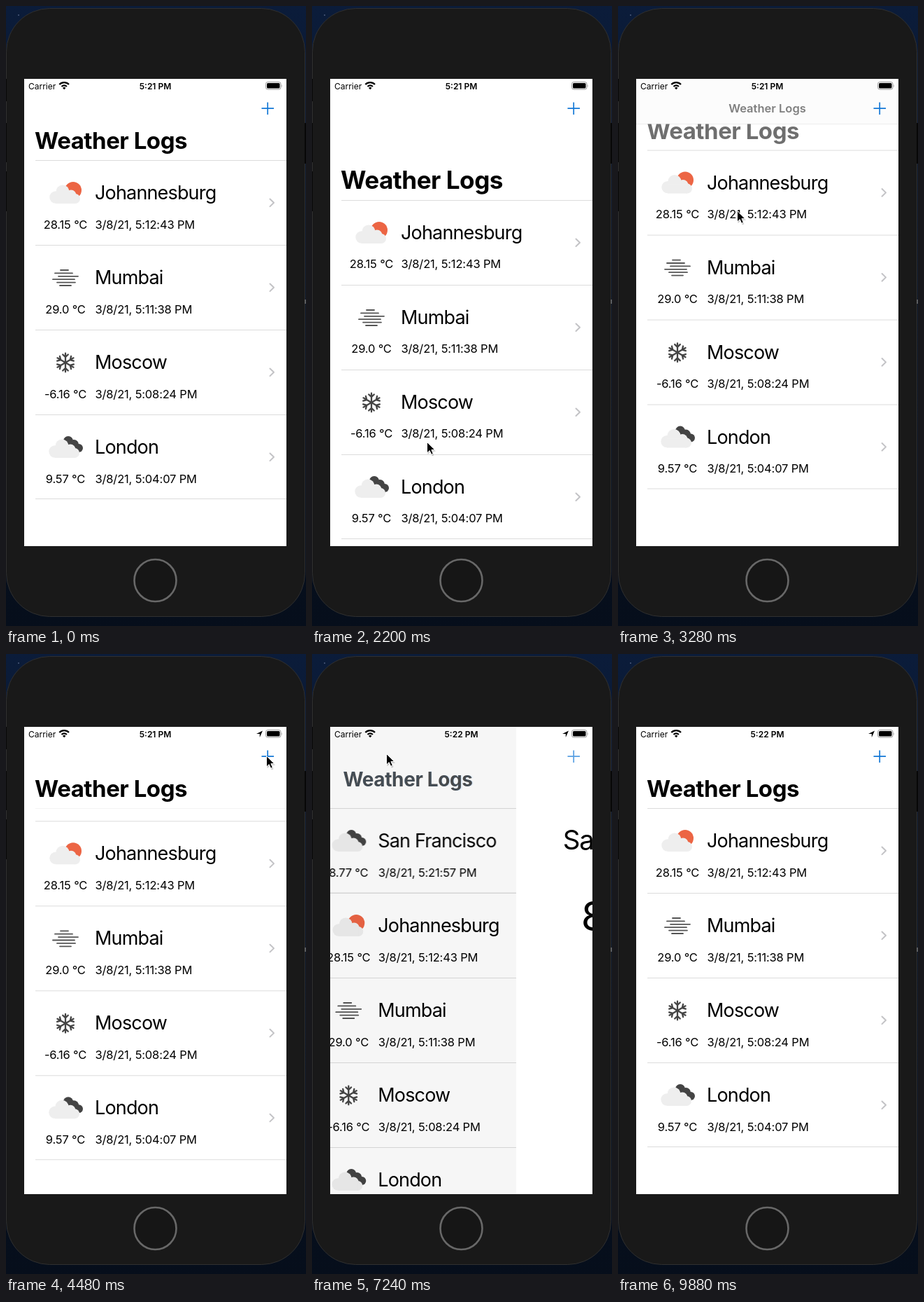
An HTML page that plays this animation: 429 px wide and 885 px high, repeating every 10000 ms.

```html
<!DOCTYPE html>
<html lang="en">
<head>
<meta charset="utf-8">
<title>Weather Logs</title>
<style>
html, body { margin: 0; width: 100%; height: 100%; overflow: hidden; background: #081224; }
svg { display: block; width: 429px; height: 885px; font-family: Inter, "Noto Sans", sans-serif; }
text { fill: #000; white-space: pre; }
.city { font-size: 27px; letter-spacing: -.031em; }
.body { font-size: 16.5px; letter-spacing: -.01em; }
.mid { text-anchor: middle; }
.large { font-size: 33px; font-weight: 700; letter-spacing: -.014em; }
.inline { font-size: 16.5px; font-weight: 600; }
.back { font-size: 16.5px; letter-spacing: -.01em; fill: #0a7aea; }
.small { font-size: 12px; }
.bold { font-weight: 600; }
.sep { stroke: #dcdcdc; stroke-width: 1; }
.chev { fill: none; stroke: #c3c3c6; stroke-width: 2; stroke-linecap: round; stroke-linejoin: round; }
.tint { fill: none; stroke: #1478d6; }

/* Every track shares one 10 s timeline: 1% = 100 ms. */
.a { animation: 10s linear infinite; }
.nav { animation-timing-function: cubic-bezier(.2, .6, .2, 1); }
.step { animation-timing-function: step-end; }

.scroll { animation-name: scroll; }
@keyframes scroll {
  0%, 7% { transform: translateY(0); animation-timing-function: ease-out; }
  15% { transform: translateY(48px); }
  22% { transform: translateY(57px); }
  23% { transform: translateY(56px); animation-timing-function: ease-in-out; }
  27% { transform: translateY(-60px); }
  29.5%, 30% { transform: translateY(-75px); }
  32.8% { transform: translateY(-14.5px); animation-timing-function: ease-out; }
  36%, 100% { transform: translateY(0); }
}
.stretch { transform-origin: 42px 204px; animation-name: stretch; }
@keyframes stretch {
  0%, 7% { transform: scale(1); animation-timing-function: ease-out; }
  15% { transform: scale(1.054); }
  22%, 23% { transform: scale(1.065); }
  24.9%, 100% { transform: scale(1); }
}
.fade { animation-name: fade; }
@keyframes fade {
  0%, 25% { opacity: 1; }
  26.2%, 32% { opacity: 0; }
  32.8% { opacity: .56; }
  33.6%, 100% { opacity: 1; }
}
.bar { animation-name: bar; }
@keyframes bar {
  0%, 25% { opacity: 0; }
  26.2%, 32% { opacity: 1; }
  32.8% { opacity: .5; }
  33.6%, 100% { opacity: 0; }
}
.cover { animation-name: cover; }
@keyframes cover { 0%, 25% { opacity: 0; } 26.2%, 33.6% { opacity: 1; } 36%, 100% { opacity: 0; } }

.rest { animation-name: rest; }
@keyframes rest {
  0%, 44% { transform: translateY(0); animation-timing-function: ease-in-out; }
  47%, 87.2% { transform: translateY(121px); animation-timing-function: ease-in-out; }
  90.2%, 100% { transform: translateY(0); }
}
.fresh { animation-name: fresh; }
@keyframes fresh {
  0%, 44% { opacity: 0; }
  46.5%, 90% { opacity: 1; }
  90.2%, 100% { opacity: 0; }
}
.swipe { animation-name: swipe; }
@keyframes swipe {
  0%, 81% { transform: translateX(0); animation-timing-function: ease-out; }
  83.6%, 87% { transform: translateX(-75px); animation-timing-function: ease-in; }
  89.5%, 90.3% { transform: translateX(-375px); }
  90.4%, 100% { transform: translateX(0); }
}

/* Push to the detail page and back */
.list { animation-name: list; }
@keyframes list {
  0%, 54.4%, 76.09%, 100% { transform: translateX(0); }
  59.4%, 71.09% { transform: translateX(-112.5px); }
}
.dim { animation-name: dim; }
@keyframes dim {
  0%, 54.4%, 76.09%, 100% { opacity: 0; }
  59.4%, 71.09% { opacity: .115; }
}
.detail { animation-name: detail; }
@keyframes detail {
  0%, 54.4%, 76.09%, 100% { transform: translateX(375px); }
  59.4%, 71.09% { transform: translateX(0); }
}
.shrink { animation-name: shrink; }
@keyframes shrink {
  0%, 54.4%, 76.09%, 100% { transform: translate(41px, 204px) scale(1); opacity: 1; }
  59.4%, 71.09% { transform: translate(53px, 152px) scale(.48); opacity: 0; }
}
.grow { animation-name: grow; }
@keyframes grow {
  0%, 54.4%, 76.09%, 100% { transform: translate(41px, 204px) scale(2.08); opacity: 0; fill-opacity: 0; }
  59.4%, 71.09% { transform: translate(53px, 152px) scale(1); opacity: 1; fill-opacity: 1; }
}
.plus { animation-name: plus; }
@keyframes plus {
  0%, 42.2%, 45%, 54.4%, 76.09%, 100% { opacity: 1; }
  42.5%, 43% { opacity: .3; }
  59.4%, 71.09% { opacity: 0; }
}
.arrow { animation-name: arrow; }
@keyframes arrow {
  0%, 57%, 71.6%, 100% { opacity: 0; }
  59.4%, 71.09% { opacity: 1; }
}

/* Hard switches */
.home { animation-name: home; }
@keyframes home { 0%, 76.09%, 100% { opacity: 1; } 54.4% { opacity: 0; } }
.away { animation-name: away; }
@keyframes away { 0%, 76.09%, 100% { opacity: 0; } 54.4% { opacity: 1; } }
.before { animation-name: before; }
@keyframes before { 0% { opacity: 1; } 71.2%, 100% { opacity: 0; } }
.after { animation-name: after; }
@keyframes after { 0% { opacity: 0; } 71.2%, 100% { opacity: 1; } }
.gps { animation-name: gps; }
@keyframes gps { 0% { opacity: 0; } 43.2%, 100% { opacity: 1; } }

.cursor { animation-name: cursor; animation-timing-function: ease-in-out; }
@keyframes cursor {
  0% { transform: translate(440px, 25px); }
  .4% { transform: translate(428px, 25px); }
  5% { transform: translate(175px, 480px); }
  7% { transform: translate(165px, 510px); animation-timing-function: ease-out; }
  15% { transform: translate(163px, 595px); }
  22% { transform: translate(164px, 622px); }
  23% { transform: translate(164px, 620px); }
  27% { transform: translate(169px, 330px); }
  29.5%, 33% { transform: translate(170px, 292px); }
  35% { transform: translate(190px, 280px); }
  41%, 46.5% { transform: translate(372px, 145px); }
  52%, 57.5% { transform: translate(266px, 268px); }
  64.4%, 67.2% { transform: translate(100px, 142px); }
  68.8%, 72.5% { transform: translate(106px, 142px); }
  79.5%, 81% { transform: translate(397px, 276px); animation-timing-function: ease-out; }
  83.6%, 84% { transform: translate(324px, 275px); }
  86.2%, 87.4% { transform: translate(361px, 278px); }
  91.2% { transform: translate(297px, 87px); animation-timing-function: linear; }
  93.2%, 100% { transform: translate(258px, -24px); }
}
</style>
</head>
<body>
<svg viewBox="0 0 429 885">
  <defs>
    <linearGradient id="night" x2="0" y2="1">
      <stop offset="0" stop-color="#0b1c3a"/>
      <stop offset=".5" stop-color="#081326"/>
      <stop offset="1" stop-color="#060e1b"/>
    </linearGradient>
    <clipPath id="screen"><path d="M26 104H401V771H26Z"/></clipPath>
    <g id="cloud" fill="#eee">
      <circle cx="-14" cy="6" r="8.7"/>
      <circle cx="-4" cy="-2" r="9.5"/>
      <circle cx="8" cy="3" r="7.5"/>
      <circle cx="14" cy="8" r="7"/>
      <rect x="-14" y="2" width="28" height="13"/>
    </g>
    <g id="sunny">
      <circle cx="11" cy="-4" r="12" fill="#ec6544"/>
      <use href="#cloud"/>
    </g>
    <g id="cloudy">
      <g fill="#444">
        <circle cx="4" cy="-9" r="7"/>
        <circle cx="12" cy="-4" r="7"/>
        <circle cx="19" cy="1" r="6"/>
      </g>
      <use href="#cloud" x="-1"/>
    </g>
    <path id="mist" fill="none" stroke="#555" stroke-width="1.8" stroke-linecap="round"
      d="M-7-11H4M-15-6.6H10M-10-2.2H18M-18 2.2H13M-12 6.6H14M-8 11H8"/>
    <g id="snow" fill="none" stroke="#444" stroke-width="2.3" stroke-linecap="round"></g>
  </defs>

  <rect width="429" height="885" fill="url(#night)"/>
  <circle cx="18" cy="13" r=".8" fill="#7886a8"/>
  <rect x=".5" y="3.5" width="427" height="868" rx="62" fill="#191919" stroke="#303030"/>
  <path d="M0 104V136M0 167V223M0 236V293M428 167V225" stroke="#080808" stroke-width="2"/>
  <path d="M428 419V425" stroke="#777" stroke-width="1.4"/>
  <circle cx="213.5" cy="820" r="30" fill="#161616" stroke="#686868" stroke-width="2.6"/>

  <g clip-path="url(#screen)">
    <rect x="26" y="104" width="375" height="667" fill="#fff"/>

    <g class="a nav list">
      <g class="a scroll">
        <g class="a fresh"><g class="a swipe" id="fresh"></g></g>
        <g class="a rest" id="rest"></g>
        <g class="a step home"><g class="a fade">
          <text class="a stretch large" x="41" y="204">Weather Logs</text>
        </g></g>
      </g>
      <g class="a cover">
        <rect x="26" y="104" width="375" height="64" fill="#fcfcfc"/>
        <path class="sep" d="M26 168.5H401" opacity=".5"/>
      </g>
      <text class="a bar inline mid" x="213.5" y="152">Weather Logs</text>
    </g>
    <rect class="a nav dim" x="26" y="104" width="375" height="667"/>

    <g class="a nav detail">
      <rect x="26" y="104" width="375" height="667" fill="#fff"/>
      <text class="city mid" x="213.5" y="279" style="font-size:38.5px">San Francisco</text>
      <text class="body" x="162" y="319">Clouds</text>
      <use href="#cloudy" transform="translate(241.5 313.5) scale(.72)"/>
      <text class="city mid" x="213.5" y="395" style="font-size:58px">8.77 °C</text>
    </g>

    <g class="a step away">
      <text class="a nav shrink large">Weather Logs</text>
      <text class="a nav grow back">Weather Logs</text>
      <path class="a arrow tint" d="M44 137.5L35.5 146L44 154.5" stroke-width="2.6"/>
    </g>
    <path class="a nav plus tint" d="M365.5 146.2H383M374.2 137.5V155" stroke-width="1.7"/>

    <text class="small" x="32" y="118.5">Carrier</text>
    <path d="M76.3 112A9.5 9.5 0 0 1 90 112M79.5 115A5.2 5.2 0 0 1 86.9 115"
      fill="none" stroke="#000" stroke-width="2.2"/>
    <path d="M83.2 119.2L81 116.9A3 3 0 0 1 85.4 116.9Z"/>
    <text class="a step before small bold mid" x="213.5" y="118.5">5:21 PM</text>
    <text class="a step after small bold mid" x="213.5" y="118.5">5:22 PM</text>
    <path class="a step gps" d="M367 109.5L362.8 119V114H358Z"/>
    <rect x="371.5" y="108.5" width="21.5" height="10.5" rx="2.8" fill="none" stroke="#999"/>
    <rect x="373" y="110" width="18.5" height="7.5" rx="1.5"/>
    <path d="M394.3 112V116Q395.8 114 394.3 112Z" fill="#999"/>
  </g>

  <g class="a cursor">
    <path d="M1 1V17L4.8 13.6L7.3 19.3L10 18.1L7.6 12.6H12.5Z" opacity=".2" transform="translate(.5 1.2)"/>
    <path d="M.5 .5V16L4.2 12.6L6.7 18.3L9.3 17.1L6.9 11.6H11.8Z" stroke="#fff"/>
  </g>
</svg>
<script>
const TOP = 220.5, ROW = 121;
const $ = id => document.getElementById(id);

function row(y, icon, city, temp, clock) {
  return `<g transform="translate(0 ${y})">
    <path class="sep" d="M42 0H401"/>
    <use href="#${icon}" x="85" y="46.5"/>
    <text class="city" x="127" y="55.5">${city}</text>
    <text class="body mid" x="85" y="97">${temp} °C</text>
    <text class="body" x="127.5" y="97">3/8/21, ${clock} PM</text>
    <path class="chev" d="M377.5 55L383 60.3L377.5 65.6"/>
  </g>`;
}

const logs = [
  ["sunny", "Johannesburg", "28.15", "5:12:43"],
  ["mist", "Mumbai", "29.0", "5:11:38"],
  ["snow", "Moscow", "-6.16", "5:08:24"],
  ["cloudy", "London", "9.57", "5:04:07"],
];

// The opaque sheet lets older rows cover the new one as they slide.
$("rest").innerHTML =
  `<rect x="26" y="${TOP + .5}" width="375" height="700" fill="#fff"/>` +
  logs.map((log, i) => row(TOP + i * ROW, ...log)).join("") +
  `<path class="sep" d="M42 ${TOP + 4 * ROW - 1}H401"/>`;

$("fresh").innerHTML =
  row(TOP, "cloudy", "San Francisco", "8.77", "5:21:57") +
  `<path class="sep" d="M42 ${TOP + ROW - .5}H401"/>
   <rect x="401" y="${TOP - .5}" width="375" height="${ROW}" fill="#ff3129"/>
   <text x="438.5" y="286" class="mid" style="font-size:14.6px;fill:#fff">Delete</text>`;

$("snow").innerHTML = [0, 60, 120, 180, 240, 300]
  .map(a => `<path transform="rotate(${a})" d="M0 0V-13.3M-3.8-11.5L0-7.8L3.8-11.5"/>`)
  .join("");
</script>
</body>
</html>
```
